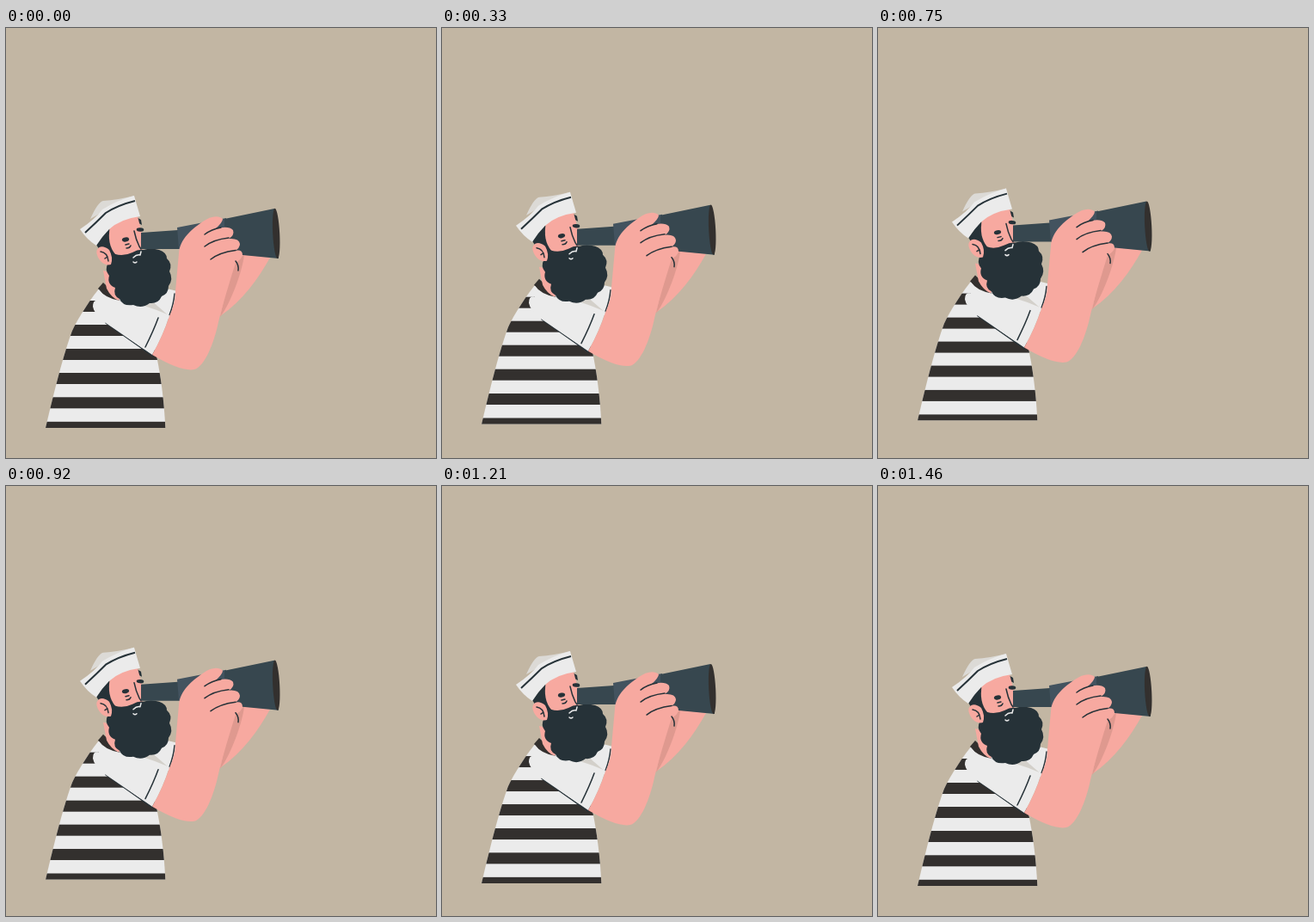
These frames come from a looping animation (500x500 px, 1500 ms). An HTML page:

```html
<!DOCTYPE html>
<html lang="en">
<head>
<meta charset="utf-8">
<title>Sailor with spyglass</title>
<style>
  html, body { margin: 0; width: 100%; height: 100%; overflow: hidden; background: #c2b6a3; }
  svg { display: block; width: 100vw; height: 100vh; }
  .ink { fill: #263238; }
  .black { fill: #33302e; }
  .white { fill: #ebebeb; }
  .skin { fill: #f7a9a0; }
  .shade { fill: #df998f; }
  .steel { fill: #37474f; }
  .line { fill: none; stroke: #263238; stroke-width: 1.5; stroke-linecap: round; stroke-linejoin: round; }
</style>
</head>
<body>
<svg viewBox="0 0 500 500">
  <defs>
    <clipPath id="torso">
      <path d="M113 297C98 315 84 337 77 352C67 379 56 422 46 465H185.300C184 435 180 404 174 376L150 322Z"/>
    </clipPath>
  </defs>
  <g id="sailor">
    <!-- far arm and collar -->
    <path class="skin" d="M262 262L307 267C293 292 276 316 249 335Z"/>
    <path class="shade" d="M263 270L277 264C275 281 263 317 249 336Z"/>
    <path class="white" d="M158 322L187 303L199 306L194 336L184 340Z"/>
    <path fill="#d3d0ca" d="M158 323L169 317L192 337Z"/>
    <path class="line" d="M196 309Q195 321 190 334"/>

    <!-- shirt -->
    <g clip-path="url(#torso)">
      <path class="white" d="M40 290H190V470H40Z"/>
      <g id="stripes" class="black"></g>
    </g>
    <path class="black" d="M113 296L107 303Q116 316 134 323L130 312Z"/>
    <path class="skin" d="M113 282L117 303Q122 313 131 317L142 290Z"/>
    <path class="line" d="M116 343L170 381"/>
    <path class="white" d="M108 304Q115 314 132 317Q158 320 190 334Q183 357 170 380L116 343Q102 332 101 324Q101 315 108 317Z"/>
    <path class="line" d="M177 337Q172 351 162 371"/>

    <!-- head -->
    <path class="ink" d="M105 252L119 232L130 250L126 270L114 266Z"/>
    <path class="ink" d="M150 219L157 223L158 229L152 226Z"/>
    <path class="skin" d="M121 231Q136 219 153 219L158 238L159 261L145 268L127 263Q117 251 121 231Z"/>
    <path class="ink" d="M119 259Q132 268 147 261Q154 257 160 258Q168 255 178 258Q187 261 187 268Q194 274 190 283Q195 292 189 300Q189 309 181 312Q177 321 167 320Q158 327 148 322Q136 324 132 315Q124 311 127 302Q117 298 120 288Q114 281 119 273Z"/>
    <path class="skin" d="M120 258C111 250 103 256 106 264C108 271 115 277 122 275Q125 267 120 258Z"/>
    <path class="line" d="M110 260Q118 261 119 271M115 268L118 266"/>
    <ellipse class="ink" cx="139" cy="246" rx="4.200" ry="2.500" transform="rotate(-12 139 246)"/>
    <ellipse class="ink" cx="156" cy="234.500" rx="4.300" ry="2.200" transform="rotate(5 156 234.500)"/>
    <path class="line" d="M149 236Q151 246 155 254L157 257M139 252L143 251M140 256Q144 256 145 253"/>
    <path class="line" style="stroke:#ebebeb" d="M148 267Q152 263 156 264L157 260M148 272Q150 274 152 272"/>

    <!-- hat -->
    <path fill="#dcdad6" d="M98 222Q107 202 113 201Q130 200 149 195L147 204L112 214Z"/>
    <path class="white" d="M86 234Q104 222 112 211Q130 200 149 195L156 219Q133 222 120 234Q112 242 105 253Q94 246 86 234Z"/>
    <path class="line" style="stroke-width:2;stroke-linecap:butt" d="M92 238Q105 226 116 215Q130 206 150 201"/>

    <!-- spyglass -->
    <path class="steel" d="M157 238L200 235L202 257H157Z"/>
    <path fill="#43535f" d="M199 232L256 221V260L201 257Z"/>
    <path class="steel" d="M254 222L312 210L317 268L254 262Z"/>
    <ellipse class="black" cx="314.200" cy="239" rx="4" ry="29.200" transform="rotate(-3 314.200 239)"/>

    <!-- near arm and hand -->
    <path class="skin" d="M170 380Q183 357 190 335Q197 320 197 306L201 262C202 245 217 233 229 225C237 219 247 217 252 222Q252 226 243 234Q258 229 264 235Q266 241 259 245Q271 244 272 251Q272 256 266 259Q275 257 275 264Q274 269 267 273C261 292 252 321 247 342C242 366 231 394 219 397Q204 400 170 380Z"/>
    <path class="line" d="M231 240Q239 234 250 232M231 254Q241 246 259 244M238 269Q248 261 267 258.500M267 271Q271 276 270 282"/>
  </g>
</svg>
<script>
  const LOOP = 1500, STEPS = 36, RISE = 8.4;
  const sailor = document.getElementById("sailor");

  document.getElementById("stripes").innerHTML = [317, 345, 373, 401, 429.3, 457.8]
    .map(y => `<rect x="40" y="${y}" width="150" height="13"/>`).join("");

  // One gentle bob, held at 24 poses per second.
  function lift(step) {
    const p = 1 - Math.abs(step * 2 / (STEPS - 1) - 1);
    return RISE * (0.65 * (1 - Math.cos(p * Math.PI)) / 2 + 0.35 * Math.sin(p * Math.PI / 2));
  }

  const start = performance.now();
  function draw(now) {
    const t = Math.max(0, now - start) % LOOP;
    const step = Math.min(STEPS - 1, Math.floor((t + 3.4) * STEPS / LOOP));
    sailor.setAttribute("transform", `translate(0 ${-lift(step).toFixed(2)})`);
    requestAnimationFrame(draw);
  }
  draw(start);
</script>
</body>
</html>
```
